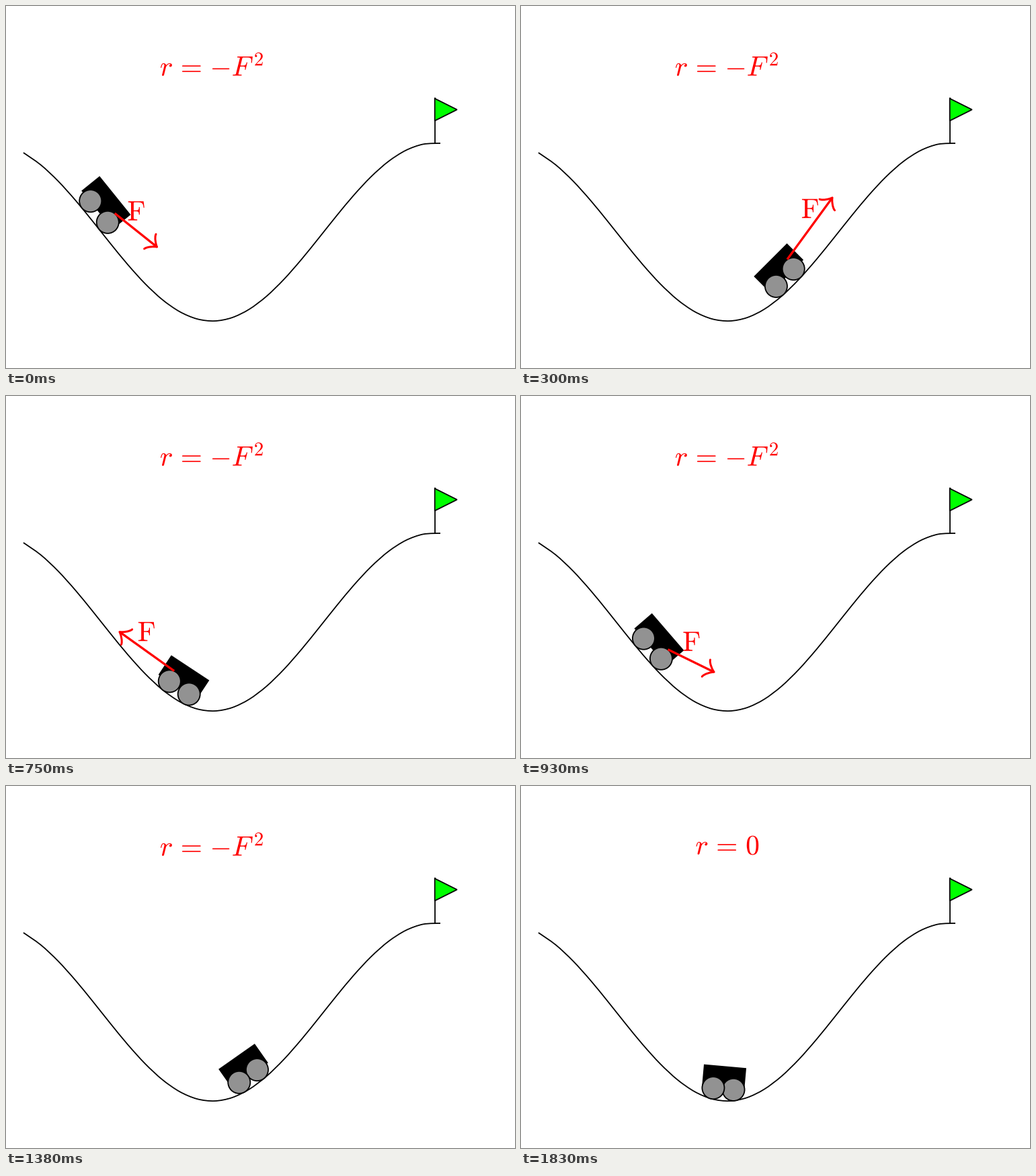
Animation, 757 px wide and 538 px high, one loop 2.25 s. Source, as a matplotlib script:

```python
import numpy as np
import matplotlib.pyplot as plt
from matplotlib.animation import FuncAnimation
from matplotlib.patches import Circle, PathPatch, Polygon
from matplotlib.path import Path
from matplotlib.textpath import TextPath
from matplotlib.transforms import Affine2D

plt.rcParams["mathtext.fontset"] = "cm"

W, H, DPI = 757, 538, 64
FRAMES, STEP = 75, 30
UNIT = 165.35              # pixels per drawing unit
X0, Y0 = 307.0, 335.9      # valley centre, middle height
AMP = 0.8 * UNIT
R = 0.1 * UNIT             # wheel radius
EM = 41.5
REST = 61                  # the car comes to a stop here

# Contact position along the track: frame, x, speed in px per frame
KEYS = np.array([
    (0, 125.6, 0), (10, 404, 27), (14.5, 467, 0), (18, 432.3, -20),
    (25, 248.6, -28), (29.5, 179, 0), (37, 299.5, 36), (42.5, 416.5, 0),
    (46, 369.6, -24), (53.5, 250, 0), (REST, 299.5, 0)])

# Force periods: first frame, last frame, direction
PUSHES = [(0, 10, 1), (17, 25, -1), (31, 38, 1), (47, 50, -1)]
# Force vectors by position: x, dx, dy
FORCE = {
    1: np.array([(125.6, 64, 51), (299.5, 82, 0), (404, 68, -93)]),
    -1: np.array([(248.6, -82.5, -59), (300, -82, 0), (432.3, -58, 60)]),
}


def px(width):
    return width * 72 / DPI


def track(x):
    return Y0 + AMP * np.cos((x - X0) / UNIT * np.pi / 2)


def position(k):
    """Cubic Hermite motion through the keys."""
    k = min(k, REST)
    i = min(np.searchsorted(KEYS[:, 0], k, side="right") - 1, len(KEYS) - 2)
    (k0, p0, v0), (k1, p1, v1) = KEYS[i], KEYS[i + 1]
    d = k1 - k0
    s = (k - k0) / d
    return ((2 * s**3 - 3 * s**2 + 1) * p0 + (s**3 - 2 * s**2 + s) * d * v0
            + (3 * s**2 - 2 * s**3) * p1 + (s**3 - s**2) * d * v1)


def push(k):
    return next((d for a, b, d in PUSHES if a <= k <= b), 0)


def track_path():
    """Smooth curve through evenly spaced samples."""
    xs = np.linspace(X0 - 1.7 * UNIT, X0 + 2.05 * UNIT, 25)
    pts = np.column_stack([xs, track(xs)])
    tan = np.zeros_like(pts)
    tan[1:-1] = 0.1526 * (pts[2:] - pts[:-2])
    verts = [pts[0]]
    for i in range(len(pts) - 1):
        verts += [pts[i] + tan[i], pts[i + 1] - tan[i + 1], pts[i + 1]]
    return Path(verts, [Path.MOVETO] + [Path.CURVE4] * (len(verts) - 1))


def glyph(s, size=EM):
    """Glyph outline, ink centred on x = 0, baseline on y = 0, y down."""
    path = TextPath((0, 0), f"${s}$", size=size)
    box = path.get_extents()
    shift = -(box.x0 + box.x1) / 2
    return Affine2D().translate(shift, 0).scale(1, -1).transform_path(path)


fig = plt.figure(figsize=(W / DPI, H / DPI), dpi=DPI, facecolor="white")
ax = fig.add_axes([0, 0, 1, 1])
ax.set_xlim(0, W)
ax.set_ylim(H, 0)
ax.axis("off")


def write(s, x, base, size=EM):
    path = Affine2D().translate(x, base).transform_path(glyph(s, size))
    return ax.add_patch(PathPatch(path, fc="red", lw=0))


thin, thick = px(1.8), px(3.3)
ax.add_patch(PathPatch(track_path(), fc="none", ec="black", lw=thin))

# Flag
fx, fy = X0 + 2 * UNIT, Y0 - AMP
top = fy - 0.4 * UNIT
ax.plot([fx, fx], [fy, top], color="black", lw=thin)
ax.add_patch(Polygon([(fx, top), (fx + 0.2 * UNIT, top + R), (fx, top + 2 * R)],
                     fc="#00ff00", ec="black", lw=thin, zorder=3))

cost = [write("r", 238.4, 103.7), write("=", 275.8, 103.7),
        write("-", 319.6, 103.7), write("F", 352, 103.7),
        write("2", 376, 88.5, 0.7 * EM)]
zero = [write("r", 268.9, 101.7), write("=", 306.2, 101.7),
        write("0", 344.5, 101.7)]

# Car and force arrow
body = ax.add_patch(Polygon(np.zeros((4, 2)), fc="black", lw=0, zorder=4))
wheels = [ax.add_patch(Circle((0, 0), R, fc="#929292", ec="black", lw=thin,
                              zorder=z)) for z in (6, 5)]
arrow = ax.add_patch(PathPatch(Path([(0, 0), (1, 1)]), fc="none", ec="red",
                               lw=thick, capstyle="butt", zorder=7))
head = ax.add_patch(PathPatch(Path([(0, 0), (1, 1)]), fc="none", ec="red",
                              lw=px(3), capstyle="round", joinstyle="round",
                              zorder=7))
label = ax.add_patch(PathPatch(Path([(0, 0), (1, 1)]), fc="red", lw=0, zorder=8))
LETTER = glyph(r"\mathrm{F}")
BARB = 3.5 * np.array([(-3.75, 4), (-3.5, 2.5), (-0.75, 0.25), (0, 0),
                       (-0.75, -0.25), (-3.5, -2.5), (-3.75, -4)])
BARB_CODES = [Path.MOVETO] + [Path.CURVE4] * 6


def draw_force(start, c, side):
    table = FORCE[side]
    vec = np.array([np.interp(c, table[:, 0], table[:, j]) for j in (1, 2)])
    ang = np.arctan2(vec[1], vec[0])
    tip = start + vec - 1.5 * vec / np.hypot(*vec)
    arrow.set_path(Path([start, tip]))
    head.set_path(Affine2D().rotate(ang).translate(*tip)
                  .transform_path(Path(BARB, BARB_CODES)))
    mid = start + vec / 2
    label.set_path(Affine2D().translate(mid[0], mid[1] - 14.7)
                   .transform_path(LETTER))


def update(k):
    c = position(k)
    gap = 25.5 + 4.7 * np.exp(-((c - 288) / 70) ** 2)
    xs = np.array([c - gap / 2, c + gap / 2])
    feet = np.column_stack([xs, track(xs)])
    chord = feet[1] - feet[0]
    size = np.hypot(*chord)
    along = chord / size
    up = np.array([along[1], -along[0]])
    hubs = feet + R * up
    for wheel, hub in zip(wheels, hubs):
        wheel.center = tuple(hub)

    # The body sits slightly uphill of the wheels
    uphill = -4.8 * along[1] * along
    mid = hubs.mean(axis=0) + uphill
    half = (size / 2 + R) * along
    body.set_xy([mid - half - up, mid - half + 33.7 * up,
                 mid + half + 33.7 * up, mid + half - up])

    side = push(k)
    for part in (arrow, head, label):
        part.set_visible(side != 0)
    if side:
        hub = hubs[1] if side > 0 else hubs[0]
        draw_force(hub + R * up + uphill, c, side)

    for part in cost:
        part.set_visible(k < REST)
    for part in zero:
        part.set_visible(k >= REST)
    return [body, *wheels, arrow, head, label, *cost, *zero]


anim = FuncAnimation(fig, update, frames=FRAMES, interval=STEP,
                     repeat=True, repeat_delay=0, blit=False)
plt.show()
```
